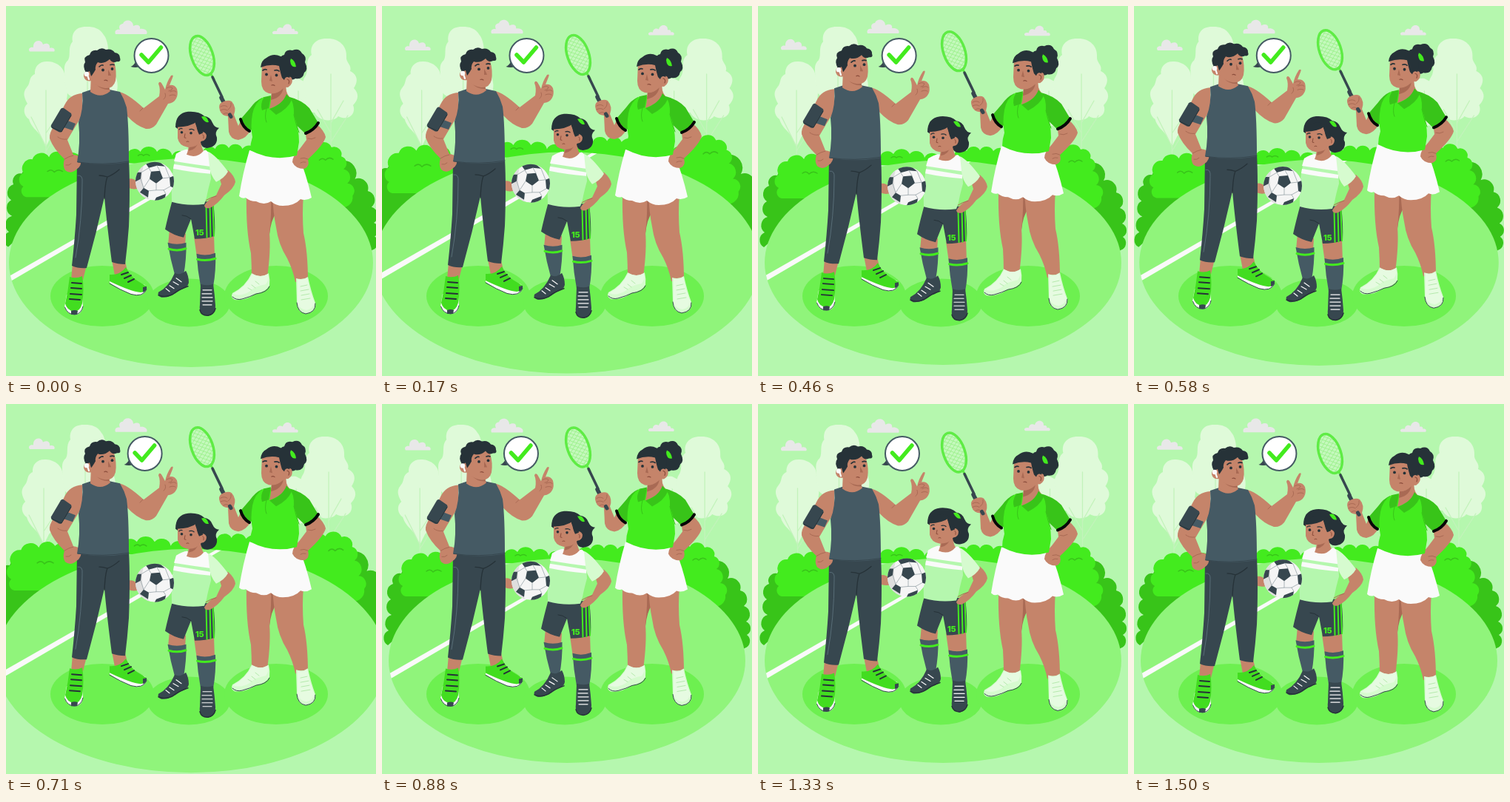
Recreate the animation shown at these times as an HTML page. Size 500 by 500 pixels, loop 1.54 s.

```html
<!DOCTYPE html>
<html lang="en">
<head>
<meta charset="utf-8">
<title>Family sports day</title>
<style>
html, body { margin: 0; width: 100%; height: 100%; overflow: hidden; background: #b5f7ae; }
svg { display: block; width: 100vw; height: 100vh; }
.ink { fill: #263238; }
.navy { fill: #37474f; }
.slate { fill: #455a64; }
.skin { fill: #c5846a; }
.shade { fill: #a96a54; }
.green { fill: #43eb1e; }
.deep { fill: #38c419; }
.white { fill: #fafafa; }
.mint { fill: #d6fbcf; }
.tree { fill: #dffad9; }
.cloud { fill: #e8e8e8; }
.line { fill: none; stroke-linecap: round; stroke-linejoin: round; }
</style>
</head>
<body>
<svg viewBox="0 0 500 500">
<defs>
  <clipPath id="court"><ellipse cx="250" cy="346.800" rx="241" ry="138.200"/></clipPath>
  <clipPath id="ballClip"><circle cx="201" cy="237" r="26"/></clipPath>
  <clipPath id="headClip"><ellipse rx="14" ry="27"/></clipPath>
</defs>
<rect width="500" height="500" fill="#b5f7ae"/>

<g id="trees">
  <path class="tree" d="M395 98C380 96 374 108 378 120C370 130 372 142 380 150C384 164 405 166 412 154L418 110Z"/>
  <path class="tree" d="M110 28C95 27 88 36 90 48C83 56 88 66 84 73C76 80 80 88 79 96C76 106 80 118 88 122C96 140 128 142 142 126C154 118 152 100 146 92C148 80 141 74 138 66C139 52 135 42 132 39C127 30 118 28 110 28Z"/>
  <path class="tree" d="M57 75C45 74 38 82 39 92C30 96 34 104 28 110C21 118 26 126 29 132C22 138 24 148 31 153C34 164 42 168 47 176L54 190L61 176C68 168 78 166 82 150C88 140 86 132 82 126C85 114 80 108 79 100C82 88 73 76 57 75Z"/>
  <path class="tree" d="M435 44C418 43 410 54 413 66C403 74 410 84 405 94C398 104 401 114 406 119C400 132 407 144 417 144C424 158 444 156 449 149C462 156 474 146 469 134C477 126 477 118 470 111C477 101 474 92 465 88C468 80 459 76 460 69C461 54 450 44 435 44Z"/>
  <g class="line" stroke="#c3f3bb" stroke-width="1.300">
    <path d="M54 114V205M54 190L34 150M54 172L70 148M54 196L76 160M110 70V130"/>
    <path d="M439 92V205M438 170L421 140M439 158L456 128M440 182L462 148M395 115V190"/>
  </g>
</g>

<path id="cloudA" class="cloud" d="M32 61.500C29 58 33 55 37 56C36 46 48 44 50 52C56 49 60 52 59 57C65 55 67 60 65 61.500Z"/>
<path id="cloudB" class="cloud" d="M148 38C146 33 150 31 154 32C151 26 156 24 158 24C160 17 172 18 172 27C179 24 182 27 181 31C189 30 192 35 190 38Z"/>
<path id="cloudC" class="cloud" d="M361 38C358 35 362 33 366 34C366 29 371 28 374 30C376 22 387 23 386 31C390 30 391 33 390 34C394 33 396 36 394 38Z"/>

<g id="ground">
  <g id="bushes"></g>
  <path class="line" stroke="#38c419" stroke-width="1.500" d="M60 226q5-4 9 1q5-5 11-1M420 211q4-4 8 0q5-5 10-1M180 205q4-3 7 0q4-3 8 0"/>
  <ellipse cx="250" cy="346.800" rx="241" ry="138.200" fill="#90f47b"/>
  <path class="white" clip-path="url(#court)" d="M5 367L286 207H293L5 375Z"/>
</g>

<g fill="#6df050">
  <ellipse cx="130" cy="392" rx="70" ry="41"/>
  <ellipse cx="247" cy="401" rx="56" ry="32.500"/>
  <ellipse cx="365" cy="392" rx="70" ry="41"/>
</g>

<g id="girl">
  <path class="skin" d="M221 302L243 308L242 325L219 323ZM254 312L281 309L282 340L258 340Z"/>
  <path class="slate" d="M218.500 320Q231 324 243.500 320Q244 342 240 364L228 363Q222 342 218.500 320ZM257.500 335Q270 339 283 334Q284 358 280 379H263Q259 358 257.500 335Z"/>
  <path class="line" stroke="#43eb1e" stroke-width="3" stroke-linecap="butt" d="M220 328.500Q232 332 243 328M258.500 342.500Q270 345.500 283 341.500"/>
  <path class="navy" d="M228 361Q235 365 243 358Q247 365 247 374Q246 381 235 384Q222 395 210 394Q204 392 206 387Q220 380 228 361ZM263 376Q272 379 280 376Q282 390 283 405Q283 418 272 419Q260 417 262 404Z"/>
  <path class="line" stroke="#263238" stroke-width="1.500" d="M206 391Q215 395 225 390Q234 383 246 379M262 411Q264 419 273 418.500Q281 417 283 409"/>
  <path class="line" stroke="#fafafa" stroke-width="1.200" d="M230 368l7 5M226 373l7 4M221 378l6 4M216 382l5 4M266 384h12M265 389h13M265 394h14M265 399h14M266 404h12"/>
  <path class="navy" d="M225 262Q219 284 215 302Q226 310 240 313L250 288L255 315Q270 315 282 311Q283 290 280 265Z"/>
  <path class="line" stroke="#263238" d="M250 288Q244 283 238 283"/>
  <path class="line" stroke="#43eb1e" stroke-width="2" d="M270.500 270L271.500 313M275.500 270L276.500 312.500M279.500 270L281 311"/>
  <text x="256" y="310.500" font-family="Inter, Arial, sans-serif" font-size="10.500" font-weight="900" fill="#43eb1e">15</text>

  <path class="skin" d="M288 231L300 222Q309 230 310 238Q308 247 295 256Q286 268 276 273Q269 275 268 270Q273 261 284 256L291 241Z"/>
  <path class="line" stroke="#a96a54" d="M270 263Q276 259 284 257"/>
  <path fill="#b5f7ae" d="M230 200Q238 195 244 194Q256 199 270 195L278 202Q276 220 277 234Q273 248 271 259L268 268Q245 271 224 265Q223 240 226 220Z"/>
  <path class="white" d="M230 200Q238 195 244 194Q256 199 270 195L277 201L275 217Q252 214 227 210ZM227 214Q252 218 276 222L276 227Q250 225 226 220Z"/>
  <path class="mint" d="M273 197Q283 201 300 224Q295 233 284 238Q276 229 275 217Z"/>
  <path class="skin" d="M247 183L264 184Q264 192 267 196Q258 207 244 201Q247 195 247 183Z"/>
  <path class="shade" d="M248 189Q255 189 260 183Q258 194 247 196Z"/>
  <path class="ink" d="M229 164Q229 145 246 143Q261 142 268 149Q276 150 279 158Q282 165 288 165Q281 171 285 178Q286 190 273 192Q264 193 263 184Q245 176 229 164Z"/>
  <path class="skin" d="M232 162Q248 164 255 154Q256 164 263 171Q269 169 271 175Q271 182 264 183Q257 192 245 191Q234 189 232 179Z"/>
  <path class="ink" d="M231 164Q235 153 249 151L263 155L266 172L261 174Q257 166 257 157Q250 163 231 164Z"/>
  <path class="green" d="M264 150Q271 147 274 157Q269 159 264 150Z"/>
  <circle class="ink" cx="237.500" cy="171" r="1.800"/><circle class="ink" cx="250" cy="172" r="1.800"/>
  <path class="line" stroke="#263238" stroke-width="1.300" d="M234 167q2-2 4-1M248 167q4-1 6 1"/>
  <path class="line" stroke="#8b4d3c" d="M242 173l-1 5l2 .5M244 183.500q2-1 3 0M266 174q2 1 1 5"/>

  <path class="skin" d="M164 234Q172 232 178 238V247Q170 249 164 245Z"/>
  <g clip-path="url(#ballClip)">
    <circle cx="201" cy="237" r="26" fill="#f5f5f5"/>
    <path fill="#dedede" d="M175 210H188Q177 236 194 263H175Z"/>
    <path class="navy" d="M196 224L208 223L212 233L203 240L194 234ZM188 212L204 208L215 217L204 216L193 219ZM221 232L229 229V247L222 244ZM203 259L216 254L214 264L200 265ZM186 246L193 250L192 259L181 252ZM176 225L183 225L182 234L174 238Z"/>
    <path class="line" stroke="#9aa5aa" stroke-width=".8" d="M196 224L193 219L183 225M208 223L204 216M212 233L221 232M203 240L203 249L193 250M203 249L213 249L222 244M213 249L216 254M194 234L186 246M182 234L186 246M215 217L221 232"/>
  </g>
</g>

<g id="man">
  <path class="skin" d="M90 348L109 350L104 370H88ZM143 343L161 345L164 358L147 364Z"/>
  <path class="white" d="M82 390L79 407Q83 417 93 417Q102 417 104 407L103 390ZM140 364L140 374Q152 383 168 389Q185 395 190 383L188 377Z"/>
  <path class="line" stroke="#37474f" d="M79.500 407Q83 417 93 417Q102 416 104 406M140 375Q155 384 169 389.500Q185 394 190 383"/>
  <path fill="#42dd20" d="M86 366Q95 369 103 365Q106 382 103 402Q100 413 92 413Q82 411 80 402Q84 385 86 366ZM140 363Q154 364 162 353Q168 365 177 371L190 379Q191 386 182 387Q169 386 140 372Z"/>
  <path class="navy" d="M88 412Q93 410 97 412L96 417H88ZM185 380L190 379Q191 385 185 387Z"/>
  <path class="line" stroke="#263238" stroke-width="2" d="M89 374l13 1M88 381l14 1M87 389l15 1M86 396l14 1M156 363l9-3M160 368l9-4M165 373l8-4"/>
  <path class="navy" d="M96 208H166Q168 245 166 298Q164 325 161 349Q151 349 143 346Q136 292 133 258Q122 307 109 354Q98 355 89 351Q93 315 95 282Z"/>
  <path class="line" stroke="#263238" stroke-width="1.300" d="M133 260Q134 238 137 231Q145 228 153 221M137 231Q131 229 126 229"/>
  <path class="line" stroke="#607680" stroke-width=".8" d="M97 229Q104 228 103 238Q103 290 94 340"/>

  <path class="skin" d="M103 118Q86 119 79 134L65 162Q58 172 59 179Q64 193 79 207Q76 216 80 222Q87 228 95 221Q103 216 101 207Q98 201 91 201L83 181Q94 162 103 148Z"/>
  <path class="line" stroke="#a96a54" d="M79 207Q85 203 91 202M81 215q4 1 7-2M70 177q5 4 12 3"/>
  <path class="slate" d="M81 154L94 159L90 168L78 164Z"/>
  <path class="navy" d="M74 139Q76 137 78 138L88 145Q89 147 88 149L75 170Q73 171 71 170L62 165Q60 163 61 161Z"/>
  <path class="line" stroke="#263238" d="M88 148L75 170L62 164"/>

  <path class="skin" d="M152 116Q163 117 186 138L207 122Q209 112 206 105Q207 101 210 104Q213 109 215 113Q217 103 223 94Q227 92 225 97L221 107Q228 106 231 112Q233 120 230 125Q227 131 219 132L203 160Q197 167 189 166Q176 162 164 149Z"/>
  <path class="line" stroke="#a96a54" d="M217 111q5-3 8 0q-1 4-5 4M222 116q5-3 8 0M221 121q5-2 8 0M215 118q2 5-2 8M185 138l-4 4"/>
  <path class="slate" d="M103 117L115 113Q125 124 140 113L154 116Q160 126 163 137Q166 160 166 211Q132 217 96 211Q101 185 98 157Q105 140 103 117Z"/>
  <path class="line" stroke="#37474f" d="M97 211Q130 216 166 210"/>
  <path class="skin" d="M115 92L139 104Q139 111 141 115Q128 126 114 116Z"/>
  <path class="shade" d="M121 105Q131 113 139 109L140 113Q129 114 121 105Z"/>
  <path class="skin" d="M114 77L138 71L146 75Q150 88 148 101Q145 112 134 111Q122 109 116 101Q107 103 105 95Q105 87 113 88Z"/>
  <path class="ink" d="M108 90Q103 81 107 76Q104 68 113 66Q115 59 123 60Q129 55 135 59Q143 57 147 63Q154 64 154 70Q156 76 150 75Q144 78 140 72Q132 79 124 76Q120 81 121 86Q117 93 115 95L113 88Z"/>
  <circle class="white" cx="109" cy="92" r="3.200"/>
  <path class="line" stroke="#fafafa" stroke-width="2.200" d="M110 93l2 6"/>
  <circle class="ink" cx="131" cy="86.500" r="1.900"/><circle class="ink" cx="143.500" cy="85" r="1.900"/>
  <path class="line" stroke="#263238" stroke-width="1.700" d="M126 82q3-3 5-2M141 79.500q3-1 5 0"/>
  <path class="shade" d="M138 86Q141 91 142 94L138 94Z"/>
  <path class="line" stroke="#8b4d3c" stroke-width="1.200" d="M133 100.500q2-1 4 .5"/>
</g>

<g id="woman">
  <path class="shade" d="M354 258H365V280Q358 289 356 309Z"/>
  <path class="skin" d="M325 255H358Q359 282 356 307Q358 330 353 367L332 366Q332 350 331 334Q324 303 325 255ZM360 255H402Q400 280 402 307Q408 332 408 372L391 373Q388 357 380 341Q368 322 365 299Q361 280 360 255Z"/>
  <path class="mint" d="M332 361Q344 369 355 361Q357 370 356 378Q351 387 337 389Q323 399 309 397Q303 394 306 388Q324 379 332 361ZM392 368Q401 371 408 366Q412 385 418 401Q420 414 405 416Q394 414 393 402Z"/>
  <path fill="#e6fbe1" d="M333 362Q344 368 354 362Q356 370 351 376Q337 378 329 386Q317 393 307 389Q324 380 333 362ZM394 369Q401 372 407 367Q410 385 417 401Q415 409 406 411Q396 409 394 402Z"/>
  <path class="line" stroke="#37474f" d="M306 393Q311 398 319 396Q330 393 338 389Q353 387 356 379M393 401Q394 414 405 416Q419 414 418 402"/>
  <path class="line" stroke="#b5eaad" d="M337 372l5 4M332 377l5 4M327 381l5 3M398 379l9-2M398 385l11-2M399 391l11-2M399 397l12-2"/>

  <path class="white" d="M329 195L395 201Q406 228 413 259Q405 264 398 261Q390 270 374 270Q365 270 358 264Q349 270 338 264Q329 264 324 259Q319 261 315 257Q320 225 329 195Z"/>

  <path class="skin" d="M404 165L419 159Q430 168 432 177Q429 188 408 207Q411 217 403 220Q391 220 387 211Q387 203 397 193L406 181Z"/>
  <path class="line" stroke="#a96a54" d="M398 206q5-2 10 1M398 212q3-2 7-1M408 179q5 2 10-1"/>
  <g class="line">
    <path stroke="#5fec45" stroke-width="3" d="M277 92L281 99"/>
    <path stroke="#37474f" stroke-width="3.500" d="M279 96L292 123"/>
    <path stroke="#37474f" stroke-width="5.500" d="M291 124L304 149"/>
  </g>
  <g transform="translate(265 67) rotate(-19)">
    <ellipse rx="14" ry="27" fill="#c4f9bc"/>
    <g clip-path="url(#headClip)"><path id="strings" class="line" stroke="#9cf18c" stroke-width=".8"/></g>
    <ellipse class="line" rx="14.500" ry="27.500" stroke="#5fec45" stroke-width="3.500"/>
  </g>
  <path class="skin" d="M318 153L331 167Q325 179 314 181Q303 180 301 170L300 149Q291 148 289 141Q286 133 292 130Q300 126 305 129Q312 137 308 147L314 162Z"/>
  <path class="line" stroke="#a96a54" d="M290 136q5-3 9 0M290 141q5-3 9 0M294 146q4-3 7 0M304 131q1 6-4 9"/>
  <path class="line" stroke="#37474f" stroke-width="5" d="M302.500 147L304 149.500"/>
  <path class="deep" d="M346 124Q337 128 330 138L317 153L329 169L344 160ZM380 122Q400 127 410 138L422 158Q415 168 404 172L386 155Z"/>
  <path class="line" stroke="#050808" stroke-width="4" stroke-linecap="butt" d="M317 153Q320 164 329 169M405 172Q416 168 422 158"/>
  <path class="green" d="M348 123L382 122Q390 130 389 147Q396 165 396 184L393 202Q361 211 330 195Q330 186 333 177Q330 163 333 146Q336 130 348 123Z"/>
  <path class="line" stroke="#38c419" d="M389 147Q391 158 396 171M352 139Q349 150 352 157"/>
  <path class="skin" d="M359 106L379 106Q377 116 383 123Q371 133 356 139Q359 127 359 106Z"/>
  <path class="shade" d="M359 118Q370 118 375 109Q374 123 358 127Z"/>
  <path class="deep" d="M358 121L355 138L346 141Q343 132 349 123ZM379 119L386 127Q381 139 365 147L356 139Q374 133 379 119Z"/>

  <path class="ink" d="M371 77Q369 67 376 66Q378 58 387 60Q396 56 400 64Q407 68 404 76Q409 86 403 90Q401 100 391 98Q386 102 381 95Z"/>
  <path class="skin" d="M346 78L369 74L374 95Q380 92 386 97Q389 105 381 110Q376 109 374 112Q365 120 355 118Q345 115 345 102Z"/>
  <path class="ink" d="M344 83Q345 73 352 70Q361 63 371 68Q381 69 384 82Q385 93 383 97Q378 94 376 100L373 97Q371 91 369 81Q357 78 344 83Z"/>
  <path class="green" d="M385 71Q391 74 392 82Q385 84 384 74Z"/>
  <circle class="ink" cx="352" cy="92.500" r="1.900"/><circle class="ink" cx="365.500" cy="93.500" r="1.900"/>
  <path class="line" stroke="#263238" stroke-width="1.700" d="M347 87q3-2 5-1M363 87q4-1 6 1"/>
  <path class="shade" d="M358 93L356 101L360 102Z"/>
  <path class="line" stroke="#8b4d3c" stroke-width="1.200" d="M359 107q2-1 4 .5M380 99q4 1 2 6"/>
</g>

<g id="bubble">
  <path class="navy" d="M175 74Q173 80 168 82Q174 84 181 82Z"/>
  <circle cx="196" cy="67" r="23" fill="#fff" stroke="#455a64" stroke-width="2"/>
  <path class="line" stroke="#43eb1e" stroke-width="5.500" stroke-linecap="butt" stroke-linejoin="miter" d="M182.500 66L192 76L209 56"/>
</g>
</svg>

<script>
const LOOP = 1540, BEAT = 1500;
const $ = id => document.getElementById(id);

// Leafy outline: round bumps along a chain of points, closed by a straight edge.
function bush(cls, pts) {
  let d = `M${pts[0]} ${pts[1]}`;
  for (let i = 2; i < pts.length; i += 2) {
    const r = Math.hypot(pts[i] - pts[i - 2], pts[i + 1] - pts[i - 1]) * .56;
    d += `A${r} ${r} 0 0 1 ${pts[i]} ${pts[i + 1]}`;
  }
  return `<path class="${cls}" d="${d}Z"/>`;
}
$('bushes').innerHTML =
  bush('deep', [8, 326, 9, 306, 13, 285, 12, 264, 15, 243, 26, 229, 60, 225, 70, 270]) +
  bush('deep', [430, 220, 450, 212, 467, 236, 484, 252, 489, 273, 492, 294, 493, 312, 490, 330, 430, 300]) +
  bush('green', [32, 260, 28, 246, 28, 228, 40, 210, 62, 207, 82, 205, 105, 212, 110, 260]) +
  bush('green', [150, 214, 165, 204, 183, 200, 205, 200, 225, 205, 245, 205, 265, 202, 282, 196, 300, 195, 318, 196, 340, 202, 345, 225]) +
  bush('green', [380, 230, 395, 200, 416, 193, 436, 194, 449, 206, 452, 223, 457, 242, 464, 258, 444, 272]);

let net = '';
for (let k = -48; k <= 48; k += 6) net += `M-15 ${k - 12}L15 ${k + 12}M-15 ${k + 12}L15 ${k - 12}`;
$('strings').setAttribute('d', net);

const move = (id, x, y) => $(id).setAttribute('transform', `translate(${x} ${y})`);

// Double pulse, given as [phase, scale] steps.
const pulse = [[0, 1], [.1, 1.1], [.3, 1], [.4, 1], [.5, 1.1], [.6, 1], [1, 1]];
function beat(p) {
  const i = Math.max(1, pulse.findIndex(s => s[0] >= p));
  const [a, u] = pulse[i - 1], [b, v] = pulse[i];
  return u + (v - u) * (p - a) / (b - a);
}

function draw(now) {
  const t = now % LOOP, w = 2 * Math.PI / LOOP;
  const lift = (1 - Math.cos(t * w)) / 2, wave = Math.sin(t * w);
  move('man', 0, -9 * lift);
  move('woman', 0, -9 * lift);
  move('bubble', .5 - 9 * lift, 0);
  move('trees', -3 * lift, 0);
  move('girl', 0, 1.8 - 4.5 * Math.cos((t - 1270) * w));
  move('cloudA', 0, -2.3 * wave);
  move('cloudB', 0, -wave);
  move('cloudC', 0, 2.3 * wave);
  const s = beat(Math.min(1, (t + 30) / BEAT));
  $('ground').setAttribute('transform', `translate(250 345) scale(${s}) translate(-250 -345)`);
}

const start = performance.now();
function tick() {
  draw(performance.now() - start);
  requestAnimationFrame(tick);
}
tick();
</script>
</body>
</html>
```
